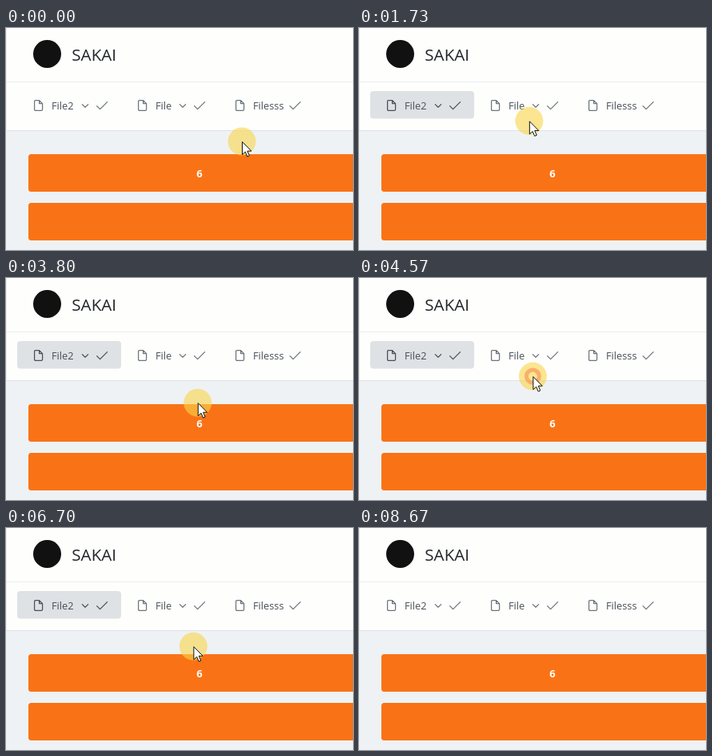
Write an HTML page that moves like this. It is 434x278 px and loops after 8710 ms.

```html
<!DOCTYPE html>
<html lang="en">
<head>
<meta charset="utf-8">
<title>Tab menu</title>
<style>
  html, body { margin: 0; width: 100%; height: 100%; overflow: hidden; background: #eff2f5; }
  svg { display: block; width: 434px; height: 278px; }
  text { font-family: "Open Sans", "Noto Sans", sans-serif; }
  .tab text { font-size: 12.8px; fill: #495057; }
  .icon { fill: none; stroke: #6c757d; stroke-width: 1.25; stroke-linecap: round; stroke-linejoin: round; }
  .back { fill: none; }
  .hover .back { fill: #e8ebee; }
  .focus .back { fill: #dee2e5; }
  .focus .icon { stroke: #495057; }
  .button { fill: #f97316; }
  .pointer { fill: #fff; stroke: #111; stroke-linejoin: round; }
</style>
</head>
<body>
<svg viewBox="0 0 434 278">
  <defs>
    <path id="file" d="M1.8 .6H6.6L10.6 4.6V12Q10.6 13.4 9.2 13.4H2Q.6 13.4 .6 12V1.8Q.6 .6 1.8 .6ZM6.6 .8V4.6H10.4"/>
    <path id="chevron" d="M.6 .6L4.3 4.2L8 .6"/>
    <path id="check" d="M.6 5.6L4.6 9.6L13.6 .6"/>
  </defs>

  <rect width="434" height="128" fill="#fefefd"/>
  <path d="M0 67.5H434" stroke="#ebedf0"/>
  <path d="M0 128.5H434" stroke="#dee2e6"/>
  <path d="M.5 0V128" stroke="#ebedf0"/>

  <circle cx="51.5" cy="32.5" r="17.5" fill="#111"/>
  <text x="82.3" y="40.5" font-size="20.6" fill="#212529">SAKAI</text>

  <g class="tab" transform="translate(14 79)">
    <rect class="back" width="130" height="34.5" rx="4"/>
    <g class="icon">
      <use href="#file" x="21" y="11"/>
      <use href="#chevron" x="80.7" y="16"/>
      <use href="#check" x="99" y="13"/>
    </g>
    <text x="43" y="23">File2</text>
  </g>
  <g class="tab" transform="translate(144 79)">
    <rect class="back" width="122" height="34.5" rx="4"/>
    <g class="icon">
      <use href="#file" x="21" y="11"/>
      <use href="#chevron" x="72.7" y="16"/>
      <use href="#check" x="91" y="13"/>
    </g>
    <text x="43" y="23">File</text>
  </g>
  <g class="tab" transform="translate(266 79)">
    <g class="icon">
      <use href="#file" x="21" y="11"/>
      <use href="#check" x="88.5" y="13"/>
    </g>
    <text x="43" y="23">Filesss</text>
  </g>

  <rect class="button" x="28" y="158" width="420" height="47" rx="3.5"/>
  <rect class="button" x="28" y="219" width="420" height="47" rx="3.5"/>
  <text x="242" y="187" font-size="13" font-weight="700" text-anchor="middle" fill="#fff">6</text>

  <g id="mouse">
    <circle r="17.5" fill="#fbd54a" opacity=".6"/>
    <circle id="ring" fill="none" stroke="#f79a5c" stroke-width="5" opacity=".7"/>
    <path id="arrow" class="pointer" d="M.5 .5V16.6L4.3 13.1L6.8 19L9.4 17.9L6.9 12.1H11.9Z"/>
    <path id="hand" class="pointer" d="M-2 0Q0 -2.6 2 0V6.2Q4 5 5.2 6.8Q7.5 5.8 8.3 7.8Q11 7 11 10V15Q10.5 18 9 19.5V22H-1V20Q-4 17.5 -6 13Q-7 10 -4.6 10.2Q-3.2 10.6 -2 12.5ZM2 6.2V10M5.2 6.8V10.2M8.3 7.8V11"/>
  </g>
</svg>
<script>
  const LOOP = 8710, BLUR = 8660, FOCUS = 440;
  const IN = [193, 87], OUT = [241, 158];

  // Evenly timed swings between the tab and the page below it
  function swing(start, end, count, inside) {
    return Array.from({ length: count + 1 }, (_, i) => ({
      t: start + (end - start) * i / count,
      at: (i % 2 === 0) === inside ? IN : OUT
    }));
  }

  const stops = [
    { t: 0, at: [295, 142] },
    { t: 180, at: [300, 198] },
    { t: 460, at: [76, 98] },
    { t: 730, at: IN },
    ...swing(930, 1914, 3, true),
    { t: 2180, at: [318, 188] },
    ...swing(2450, 2930, 2, true),
    ...swing(2930, 4430, 5, true),
    ...swing(4430, 5570, 4, false),
    ...swing(5774, 7849, 5, false),
    { t: 8370, at: [240, 300] },
    { t: LOOP, at: [240, 300] }
  ];

  const $ = id => document.getElementById(id);
  const [file2, file] = document.querySelectorAll(".tab");

  function position(t) {
    const i = stops.findIndex(s => s.t > t);
    const a = stops[i - 1], b = stops[i];
    const u = (t - a.t) / (b.t - a.t), ease = u * u * (3 - 2 * u);
    return a.at.map((v, k) => v + (b.at[k] - v) * ease);
  }

  const within = ([x, y], left, right) => x >= left && x < right && y >= 79 && y < 113.5;

  function draw(t) {
    const pos = position(t);
    const onFile2 = within(pos, 14, 144), onFile = within(pos, 144, 266);
    file2.classList.toggle("hover", onFile2);
    file2.classList.toggle("focus", t > FOCUS && t < BLUR && !onFile);
    file.classList.toggle("hover", onFile);

    // A click ripple follows each turn outside the tab
    const turn = stops.filter(s => s.at === OUT && s.t <= t).pop();
    const p = turn ? (t - turn.t - 100) / 160 : -1;
    $("ring").setAttribute("r", 7 + 4 * p);
    $("ring").style.display = p >= 0 && p < 1 ? "" : "none";

    $("mouse").setAttribute("transform", `translate(${pos[0].toFixed(2)} ${pos[1].toFixed(2)})`);
    const link = onFile2 || onFile;
    $("arrow").style.display = link ? "none" : "";
    $("hand").style.display = link ? "" : "none";
  }

  const start = performance.now();
  function tick() {
    draw(Math.max(0, performance.now() - start) % LOOP);
    requestAnimationFrame(tick);
  }
  draw(0);
  requestAnimationFrame(tick);
</script>
</body>
</html>
```
